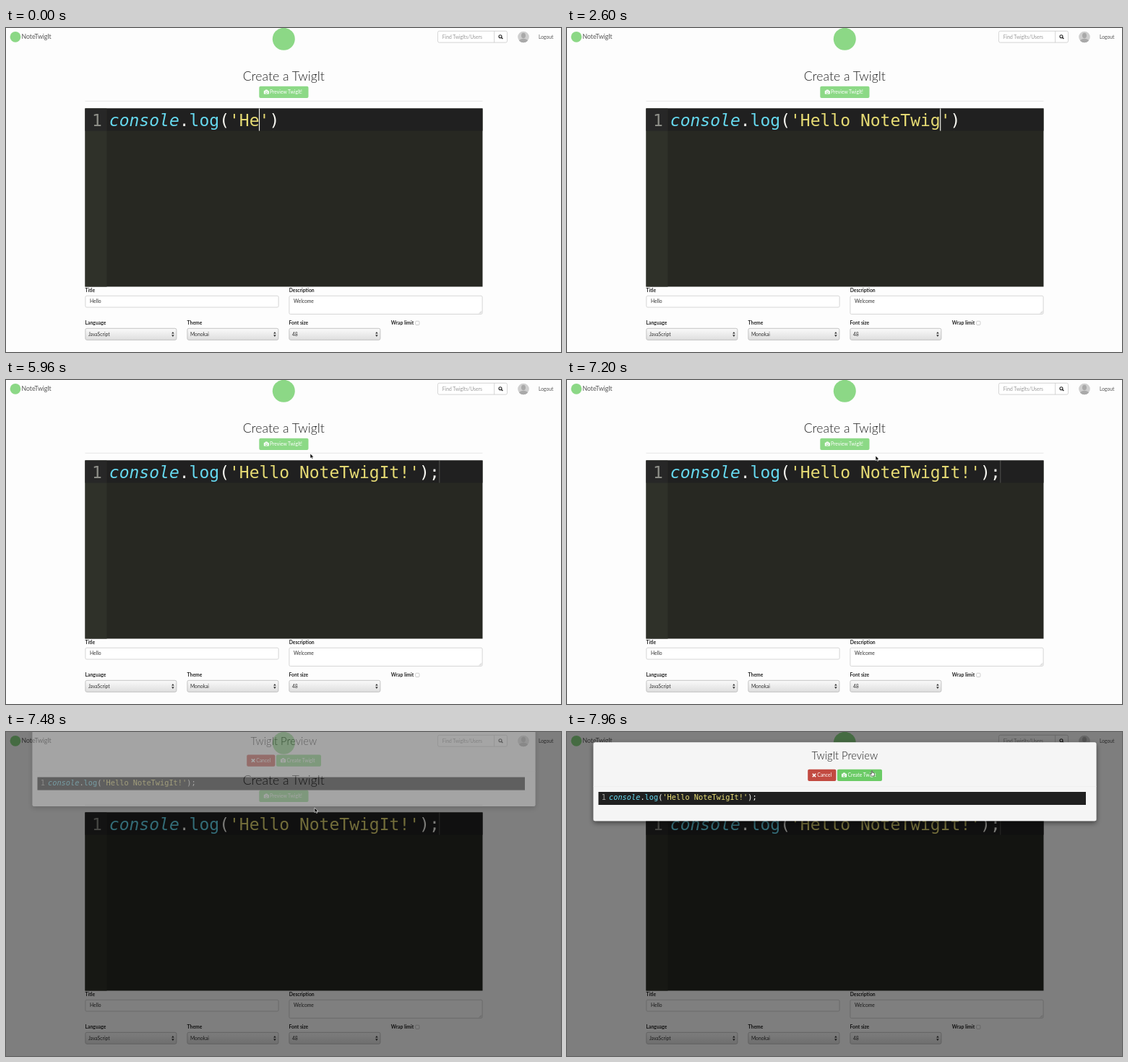
These frames come from a looping animation (768x449 px, 8 s). An HTML page:

```html
<!DOCTYPE html>
<html lang="en">
<head>
<meta charset="utf-8">
<title>Create a TwigIt</title>
<style>
  html, body { margin: 0; width: 100%; height: 100%; overflow: hidden; background: #fdfdfd; }
  svg { display: block; width: 768px; height: 449px; }
  text { font-family: Lato, sans-serif; font-size: 6.75px; fill: #333; white-space: pre; }
  .label { font-weight: 700; fill: #222; }
  .title { font-weight: 300; fill: #222; text-anchor: middle; }
  .white { fill: #fff; }
  .code { font-family: "DejaVu Sans Mono", monospace; fill: #f8f8f2; }
  .fn { fill: #66d9ef; }
  .obj { fill: #66d9ef; font-style: italic; }
  .str { fill: #e6db74; }
  .field { fill: #fff; stroke: #ccc; stroke-width: .8; }
</style>
</head>
<body>
<svg viewBox="0 0 768 449">
  <defs>
    <linearGradient id="sel" x2="0" y2="1">
      <stop offset="0" stop-color="#fafafa"/><stop offset="1" stop-color="#dedede"/>
    </linearGradient>
    <filter id="shadow" x="-5%" y="-20%" width="110%" height="150%">
      <feDropShadow dx="0" dy="2.5" stdDeviation="3.5" flood-opacity=".5"/>
    </filter>
    <clipPath id="face"><circle cx="716" cy="12.5" r="7.8"/></clipPath>
    <g id="camera">
      <path fill="#fff" fill-rule="evenodd" d="M.6 1.2H1.7L2.2 0H4.8L5.3 1.2H6.4Q7 1.2 7 1.8V5.4Q7 6 6.4 6H.6Q0 6 0 5.4V1.8Q0 1.2 .6 1.2ZM3.5 1.8A1.75 1.75 0 1 0 3.5 5.3A1.75 1.75 0 1 0 3.5 1.8Z"/>
      <circle cx="3.5" cy="3.55" r="1.1" fill="#fff"/>
    </g>
  </defs>

  <rect width="768" height="449" fill="#fdfdfd"/>

  <!-- header -->
  <circle cx="13" cy="12.3" r="7.4" fill="#8cd886"/>
  <text x="21.5" y="15.2" style="font-size:8.7px;fill:#555">NoteTwigIt</text>
  <circle cx="384.3" cy="15.3" r="15.5" fill="#8cd886"/>
  <rect class="field" x="597.5" y="4.3" width="96" height="15.8" rx="2"/>
  <path d="M675.6 4.3V20.1" stroke="#ccc" stroke-width=".8"/>
  <text x="603.8" y="14.5" style="fill:#999">Find TwigIts/Users</text>
  <circle cx="684" cy="11.7" r="2" fill="none" stroke="#222" stroke-width="1.1"/>
  <path d="M685.5 13.2L687.4 15.1" stroke="#222" stroke-width="1.4"/>
  <g clip-path="url(#face)">
    <rect x="708" y="4" width="16" height="17" fill="#cfcfcf"/>
    <ellipse cx="716" cy="10.6" rx="3" ry="3.8" fill="#a9a9a9"/>
    <path d="M709 21Q709 16 714 15H718Q723 16 723 21Z" fill="#a9a9a9"/>
  </g>
  <text x="737" y="14.5" style="fill:#555">Logout</text>

  <text class="title" x="384.3" y="72.8" style="font-size:17.6px">Create a TwigIt</text>
  <rect x="350.3" y="80.8" width="68.2" height="16.2" rx="2" fill="#8cd986"/>
  <use href="#camera" x="356.8" y="85.6"/>
  <text class="white" x="365" y="91.3">Preview TwigIt!</text>
  <path d="M109.5 101.3H659.5" stroke="#e6e6e6" stroke-width=".9"/>

  <!-- editor -->
  <rect x="109.5" y="111.5" width="550" height="247" fill="#272822"/>
  <rect x="109.5" y="111.5" width="30" height="247" fill="#2f3129"/>
  <rect x="109.5" y="111.5" width="30" height="31" fill="#272727"/>
  <rect x="139.5" y="111.5" width="520" height="31" fill="#202020"/>
  <text class="code" x="119" y="136" style="font-size:23px;fill:#8f908a">1</text>
  <text class="code" x="142.8" y="136" style="font-size:23px"><tspan class="obj">console</tspan>.<tspan class="fn">log</tspan>(<tspan class="str" id="str"></tspan><tspan id="tail"></tspan></text>
  <rect id="caret" y="111.5" width="1.1" height="31" fill="#f8f8f0"/>

  <!-- form -->
  <text class="label" x="109.5" y="366">Title</text>
  <text class="label" x="391.7" y="366">Description</text>
  <rect class="field" x="109.9" y="371.2" width="267.2" height="15.8" rx="1.8"/>
  <text x="116" y="381.3">Hello</text>
  <rect class="field" x="391.9" y="371.2" width="267.2" height="25.4" rx="1.8"/>
  <text x="398" y="381.3">Welcome</text>
  <path d="M655 395.5L658 392.5M656.8 395.5L658 394.3" stroke="#999" stroke-width=".6"/>
  <g id="selects"></g>
  <text class="label" x="532.8" y="411">Wrap limit</text>
  <rect x="566.7" y="406.3" width="5.2" height="5.2" rx="1" fill="#fff" stroke="#bbb" stroke-width=".7"/>

  <rect id="shade" width="768" height="449"/>

  <!-- preview dialog -->
  <g id="modal">
    <rect x="36.5" y="14.3" width="696" height="109" rx="2.5" fill="#f5f5f5" filter="url(#shadow)"/>
    <text class="title" x="384.3" y="38" style="font-size:14.7px">TwigIt Preview</text>
    <rect x="333.2" y="51.8" width="39.2" height="16.3" rx="2" fill="#c24a41"/>
    <path d="M339.8 57.8L344.2 62.2M344.2 57.8L339.8 62.2" stroke="#fff" stroke-width="1.6"/>
    <text class="white" x="346.2" y="62.3">Cancel</text>
    <rect id="create" x="374" y="51.8" width="62" height="16.3" rx="2" fill="#7fd27a"/>
    <use href="#camera" x="380" y="56.6"/>
    <text class="white" x="388.6" y="62.3">Create TwigIt</text>
    <path d="M36.5 75.4H732.5" stroke="#e9e9e9" stroke-width=".6"/>
    <rect x="43.5" y="83" width="674.5" height="18" fill="#202020"/>
    <text class="code" x="47.8" y="94.3" style="font-size:10.3px;fill:#a0a19b">1</text>
    <text class="code" x="58" y="94.3" style="font-size:10.3px"><tspan class="obj">console</tspan>.<tspan class="fn">log</tspan>(<tspan class="str">'Hello NoteTwigIt!'</tspan>);</text>
  </g>

  <path id="arrow" d="M0 0V6.6L1.6 5.2L2.7 7.6L3.8 7.1L2.8 4.8H4.9Z" fill="#000" stroke="#fff" stroke-width=".6"/>
  <path id="hand" d="M-.7 0Q0 -.9 .7 0V2.4L3 2.9Q3.8 3.2 3.6 4.2L3 7H-.9L-2.9 4.2Q-2.6 3.2 -.7 4.5Z" fill="#fff" stroke="#222" stroke-width=".6"/>
</svg>
<script>
const $ = id => document.getElementById(id);
const set = (id, attrs) => { for (const k in attrs) $(id).setAttribute(k, attrs[k]); };
const clamp = v => Math.max(0, Math.min(1, v));
const smooth = v => v * v * (3 - 2 * v);

$('selects').innerHTML = [['Language', 'JavaScript', 109.9], ['Theme', 'Monokai', 250.9], ['Font size', '48', 391.9]]
  .map(([name, value, x]) => `<text class="label" x="${x - .3}" y="411">${name}</text>
    <rect x="${x}" y="416.3" width="126" height="16" rx="2" fill="url(#sel)" stroke="#b8b8b8" stroke-width=".8"/>
    <text x="${x + 4}" y="426.6">${value}</text>
    <path d="M${x + 119.2} 423.6l1.8 -2.7l1.8 2.7zM${x + 119.2} 425.2l1.8 2.7l1.8 -2.7z" fill="#333"/>`).join('');

const LOOP = 8000, STEP = 40, ADVANCE = 23 * .602;
const words = 'Hello NoteTwigIt!';
const keys = [200, 420, 600, 850, 1150, 1300, 1450, 1600, 1850, 2050, 2250, 2450,
  2850, 3020, 3300, 3600, 3800, 4200];
// time, x, y
const route = [[5240, 255, 67], [5480, 280, 79], [5880, 421, 102], [6300, 421, 102], [6600, 410, 91],
  [6850, 410, 91], [7150, 427, 105], [7520, 427, 105], [7880, 422, 54]];

// cubic-bezier(0, 0, .58, 1)
function easeOut(v) {
  let lo = 0, hi = 1;
  for (let i = 0; i < 20; i++) {
    const s = (lo + hi) / 2;
    if (3 * (1 - s) * s * s * .58 + s ** 3 < v) lo = s; else hi = s;
  }
  return 3 * (1 - lo) * lo * lo + lo ** 3;
}

function pointer(t) {
  let i = 0;
  while (i < route.length - 2 && t >= route[i + 1][0]) i++;
  const [a, x, y] = route[i], [b, u, v] = route[i + 1];
  const p = smooth(clamp((t - a) / (b - a)));
  return [x + (u - x) * p, y + (v - y) * p];
}

function draw(t) {
  const typed = 2 + keys.filter(k => k <= t).length;
  $('str').textContent = "'" + words.slice(0, typed) + "'";
  $('tail').textContent = typed > 19 ? ');' : ')';
  const last = keys.filter(k => k <= t).pop() || 0;
  const lit = t < 6200 && (t - last) % 1000 < 500;
  set('caret', { x: 142.3 + ADVANCE * (13 + typed), opacity: lit ? 1 : .2 });

  set('shade', { opacity: .5 * clamp((t - 7200) / 150) });
  const slide = easeOut(clamp((t - 7432) / 300));
  set('modal', {
    opacity: clamp((t - 7432) / 150),
    transform: `translate(0 ${-27.25 * (1 - slide)})`
  });

  const [x, y] = pointer(t);
  const preview = t < 7200 && x < 418 && x > 350 && y > 81 && y < 97;
  const create = t > 7600 && y > 52 && y < 68;
  const hover = preview || create;
  const at = `translate(${x} ${y})`;
  set('create', { fill: create ? '#6bcb66' : '#7fd27a' });
  set('arrow', { transform: at, opacity: t >= route[0][0] && !hover ? 1 : 0 });
  set('hand', { transform: at, opacity: t >= route[0][0] && hover ? 1 : 0 });
}

function tick() {
  draw(Math.floor(performance.now() % LOOP / STEP) * STEP);
  requestAnimationFrame(tick);
}
tick();
</script>
</body>
</html>
```
